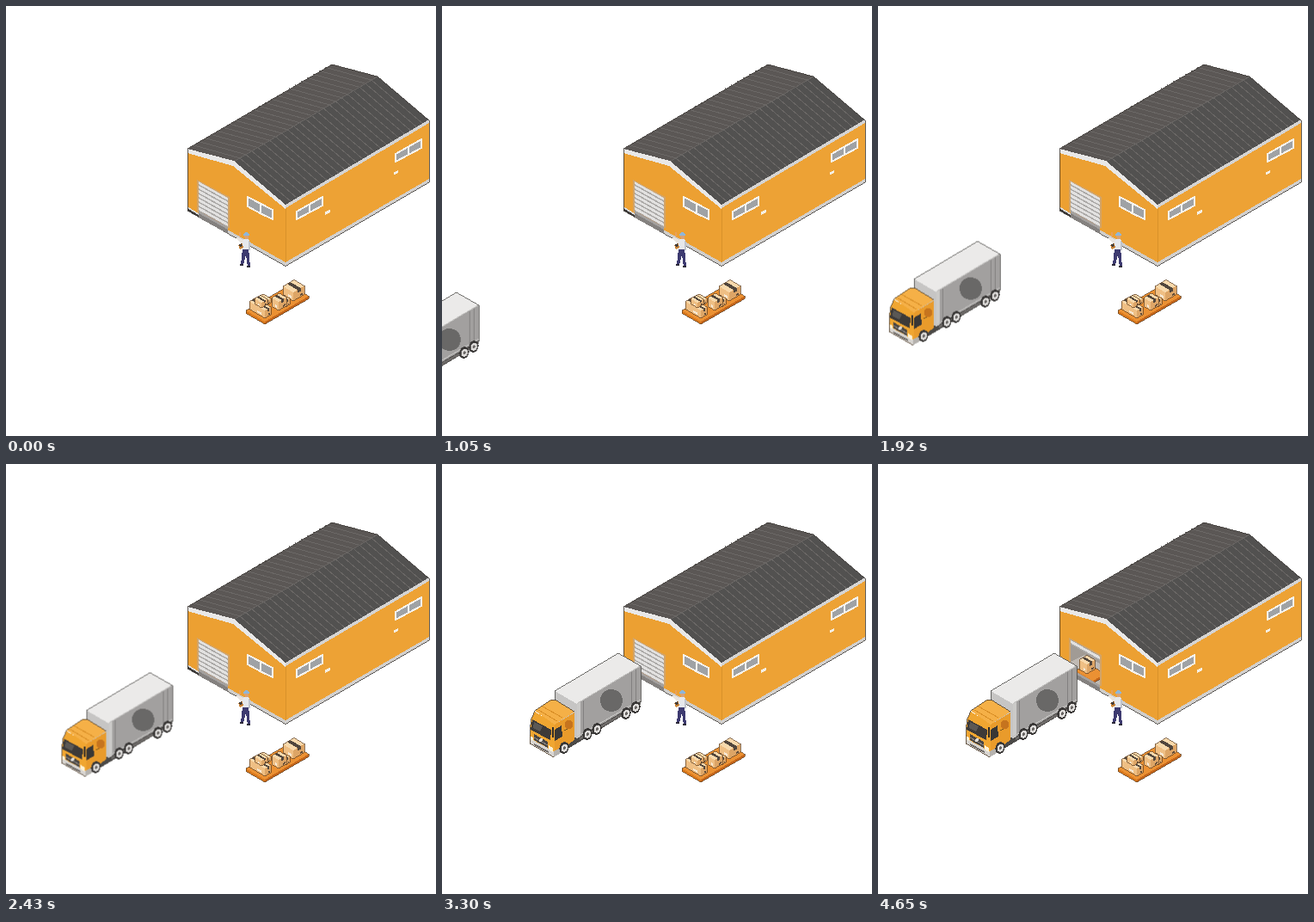
An HTML page for the animation above (5.43 s loop, 500 by 500 pixels).

```html
<!DOCTYPE html>
<html lang="en">
<head>
<meta charset="utf-8">
<title>Warehouse delivery</title>
<style>
  html, body { margin: 0; width: 100%; height: 100%; overflow: hidden; background: #fff; }
  svg { display: block; width: 100vw; height: 100vh; }
  #truck { animation: drive 5430ms infinite; }
  #shutter { animation: lift 5430ms infinite; }
  @keyframes drive {
    0% { transform: translate(-245px, 147px); animation-timing-function: cubic-bezier(.37, 0, .63, 1); }
    60.3%, 100% { transform: none; }
  }
  @keyframes lift {
    0%, 69.6% { transform: none; animation-timing-function: cubic-bezier(.37, 0, .63, 1); }
    85.6%, 100% { transform: translateY(-29px); }
  }
</style>
</head>
<body>
<svg viewBox="0 0 500 500" shape-rendering="crispEdges">
  <defs>
    <clipPath id="doorway"><path d="M224 204L258 223V257L224 238Z"/></clipPath>
  </defs>

  <g id="building">
    <path d="M211 166L265 181L325 232V302L211 237Z" fill="#eca032"/>
    <path d="M325 232L492 133V205L325 302Z" fill="#eda235"/>
    <path d="M211 234L325 298V302L211 238Z" fill="#cfcdca"/>
    <path d="M325 298L492 201V205L325 302Z" fill="#d2d0ce"/>
    <path d="M211 166L379 68L432 82L265 181Z" fill="#5b5755"/>
    <path d="M265 181L432 82L492 133L325 232Z" fill="#525150"/>
    <path id="ribs" fill="none" stroke="#6b6866"/>
    <path d="M265 181L432 82" stroke="#686563"/>
    <path d="M211 166L265 180L325 231V236L264 186L211 171Z" fill="#e9e8e7"/>
    <path d="M325 231L492 132V136L325 235Z" fill="#d5d4d3"/>
    <path d="M325 236V298" stroke="#d8912a"/>
    <path d="M211 238V166L379 68L432 82L492 133V205L325 302.500L211 238" fill="none" stroke="#3a3632" stroke-width=".8"/>
    <path d="M211 235L224 242V245L211 238Z" fill="#3c3a39"/>
    <path d="M212 234L224 241V243L212 236Z" fill="#dddcda"/>

    <g fill="#9fa2a5" stroke="#f4f2ee" stroke-width="2">
      <path d="M281 222L295.500 229.500V241L281 233ZM295.500 229.500L310 237V248L295.500 241Z"/>
      <path d="M338 239L353 230.500V240L338 248ZM353 230.500L368 222V232L353 240Z"/>
      <path d="M453 172L468 163.500V173L453 181ZM468 163.500L483 155V165L468 173Z"/>
    </g>
    <path d="M371 239.500L377 236.500V240L371 243ZM451 193.500L456 191V194L451 196.500Z" fill="#f5efe4"/>

    <path d="M222 202L260 222V258H258V223L224 204V240H222Z" fill="#d3a467"/>
    <path d="M224 238L258 257V265L224 246Z" fill="#84817f"/>
    <path d="M224 238L258 257V260L224 241Z" fill="#a3a09e"/>
    <g clip-path="url(#doorway)">
      <path d="M224 204L258 223V257L224 238Z" fill="#a19b95"/>
      <path d="M224 230L240 222L258 232V258L224 239Z" fill="#c0bab4"/>
      <g id="stock"></g>
      <g id="shutter">
        <path d="M224 204L258 223V257L224 238Z" fill="#e2e1e0"/>
        <path id="slats" fill="none" stroke="#aaa8a6" stroke-width="1.500"/>
      </g>
    </g>
  </g>

  <g id="worker">
    <path d="M275 282H282L284 303H281L279 289L276 301H273Z" fill="#3d3a70"/>
    <path d="M272 300H276V302H272ZM280 302H284V304H280Z" fill="#2b2838"/>
    <path d="M275 272L279 270L283 272L284 283H275Z" fill="#e6e8ec"/>
    <path d="M282 273L284 275V284H282Z" fill="#bfc3cb"/>
    <path d="M276 272L275 277L270 273L268 270L270 269Z" fill="#e9e4df"/>
    <path d="M271 263H273V268H271Z" fill="#e8a05c"/>
    <path d="M277 266H282V271H278Z" fill="#dba274"/>
    <path d="M276 267Q276 263 279.500 263T283 267Z" fill="#8fb6d8"/>
    <path d="M270 278L275 276L276 281L272 283Z" fill="#c98438"/>
    <path d="M271 277L274 276L275 279L272 280Z" fill="#443c38"/>
  </g>

  <g id="load"></g>

  <g id="truck">
    <path d="M135 325L231 270V280L150 329L135 334Z" fill="#4b4947"/>
    <path d="M160 318L231 277V280L160 321Z" fill="#6d6a68"/>
    <path d="M131 264L157 279V319L131 304Z" fill="#c6c5c4"/>
    <path d="M157 279L231 235V276L157 319Z" fill="#a2a09f"/>
    <path d="M131 264L205 220L231 235L157 279Z" fill="#ebeae9"/>
    <path d="M157 279L161 276.500V317L157 319Z" fill="#cbcac8"/>
    <path d="M164 275V315M220 242V282M225 239V279" stroke="#828080"/>
    <path d="M157 278.500L231 234.500M157 317L231 274" stroke="#c3c2c0"/>
    <path d="M131 300V264L205 220L231 235V277" fill="none" stroke="#4c4a48" stroke-width=".8"/>
    <circle cx="197" cy="275" r="13" fill="#696867"/>

    <path d="M131 303L154 289V321L131 337Z" fill="#e99b2b"/>
    <path d="M104 296L108 288L131 302V337L102 322Z" fill="#f0a631"/>
    <path d="M108 287L127 274L133 275L154 288L131 303Z" fill="#f5b047"/>
    <path d="M112 286L134 299M117 282L140 295" stroke="#d98e25"/>
    <path d="M105 297L127 309L126 321L103 309Z" fill="#3d3a38"/>
    <path d="M107 300L117 305L114 311L106 307Z" fill="#5b5855"/>
    <path d="M131 309L139 304L140 317L131 322Z" fill="#393735"/>
    <path d="M129 306V318" stroke="#2e2b29" stroke-width="2"/>
    <path d="M107 314L123 323V330L107 321Z" fill="#4a4643"/>
    <path d="M107 318L123 327" stroke="#8d8986"/>
    <path d="M102 319L130 334V341L102 325Z" fill="#d8d5d1"/>
    <path d="M107 325L124 334V336L107 327Z" fill="#6d6966"/>
    <path d="M102 316L106 318V322L102 320ZM124 327L129 330V335L124 332Z" fill="#fff3d6"/>
    <path d="M130 334L138 330V336L130 341Z" fill="#b5b2ae"/>
    <path d="M142 310L146 308" stroke="#7d571d"/>
    <circle cx="115" cy="321" r="2" fill="#dddad6"/>
    <circle cx="147.500" cy="303" r="5" fill="#c6741e"/>
    <path d="M102 325V310L104 296L108 287L127 274L133 275L154 288M102 325L130 341" fill="none" stroke="#4a3925" stroke-width=".8"/>
    <g id="wheels"></g>
  </g>
</svg>

<script>
  const $ = id => document.getElementById(id);
  const SLOPE = 0.58;
  const poly = (fill, ...pts) => `<path d="M${pts.map(p => p.join(' ')).join('L')}Z" fill="${fill}"/>`;

  // Isometric block; x, y is the front bottom corner.
  function block(x, y, a, b, h, tones, taped) {
    const at = (u, v, z) => [x - u * a + v * b, y - z * h - (u * a + v * b) * SLOPE];
    let out = poly(tones[0], at(0, 0, 0), at(1, 0, 0), at(1, 0, 1), at(0, 0, 1))
      + poly(tones[1], at(0, 0, 0), at(0, 1, 0), at(0, 1, 1), at(0, 0, 1))
      + poly(tones[2], at(0, 0, 1), at(1, 0, 1), at(1, 1, 1), at(0, 1, 1));
    if (taped) {
      out += poly('#51463d', at(0, .38, 1), at(1, .38, 1), at(1, .66, 1), at(0, .66, 1))
        + poly('#51463d', at(0, .38, 1), at(0, .66, 1), at(0, .66, .65), at(0, .38, .65))
        + poly('#f6ead8', at(.2, 0, .2), at(.5, 0, .2), at(.5, 0, .45), at(.2, 0, .45))
        + poly('#5d4a38', at(0, .6, .12), at(0, .85, .12), at(0, .85, .32), at(0, .6, .32));
    }
    const rim = [at(0, 0, 0), at(1, 0, 0), at(1, 0, 1), at(1, 1, 1), at(0, 1, 1), at(0, 1, 0)];
    return out + `<path d="M${rim.join('L')}Z" fill="none" stroke="#5c3d1f" stroke-width=".7"/>`;
  }

  const card = ['#efbf84', '#dda566', '#f8d9ac'];
  const wood = ['#d9781c', '#c5661a', '#eb9133'];
  const carton = (...size) => block(...size, card, true);

  $('load').innerHTML = block(301, 370, 22, 51, 3, wood)
    + carton(334, 343, 12, 13, 10) + carton(325, 350, 6, 5, 7)
    + carton(317, 354, 8, 9, 10) + carton(298, 351, 9, 10, 5)
    + carton(301, 363, 18, 7, 9) + carton(297, 351, 8, 7, 6);
  $('stock').innerHTML = block(250, 255, 20, 14, 3, wood) + carton(243, 244, 9, 9, 11);

  let ribs = '';
  for (let i = 1; i < 24; i++) {
    const dx = 167 * i / 24, dy = -99 * i / 24;
    ribs += `M${211 + dx} ${166 + dy}l54 15l60 51`;
  }
  $('ribs').setAttribute('d', ribs);

  let slats = '';
  for (let y = 208; y < 240; y += 5) slats += `M224 ${y}l34 19`;
  $('slats').setAttribute('d', slats);

  $('wheels').innerHTML = [[225, 283], [214, 290], [180, 308], [169, 314], [142, 330]].map(([x, y]) =>
    `<g transform="translate(${x} ${y}) rotate(18)">
      <ellipse rx="5.500" ry="7" fill="#3b3938"/>
      <ellipse cx=".5" rx="3.500" ry="4.600" fill="#dedcda"/>
      <ellipse cx=".5" rx="1.500" ry="2" fill="#6a6765"/>
    </g>`).join('');
</script>
</body>
</html>
```
